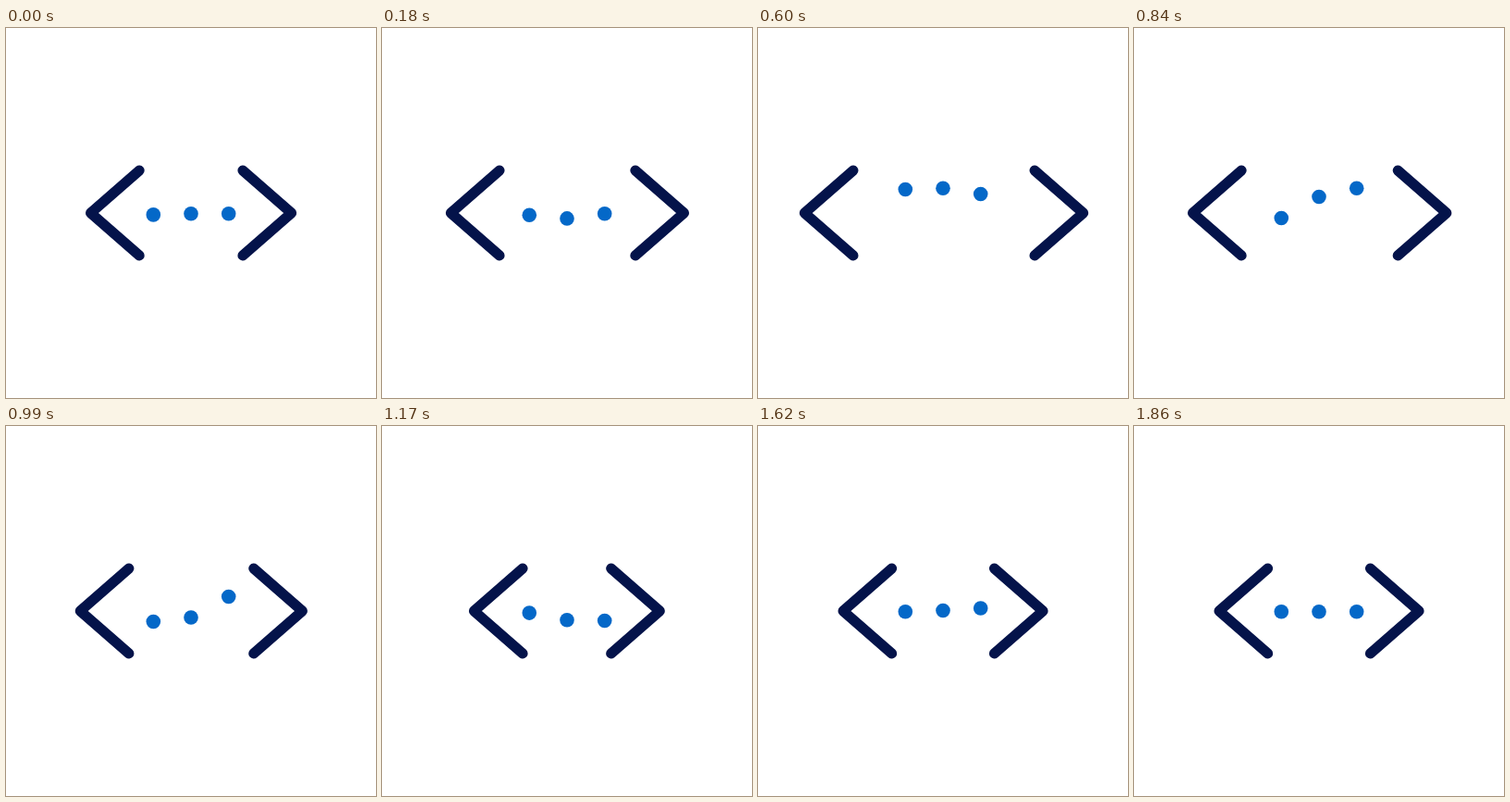
An HTML page that plays this animation: 400x400 px, repeating every 3.89 s.

```html
<!DOCTYPE html>
<html lang="en">
<head>
<meta charset="utf-8">
<title>Code brackets</title>
<style>
  html, body { margin: 0; width: 100%; height: 100%; overflow: hidden; background: #fff; }
  svg { display: block; width: 100%; height: 100%; }
  .bracket { fill: none; stroke: #04134a; stroke-width: 11; stroke-linecap: round; stroke-linejoin: round; }
  .dot { fill: #0468c8; }
</style>
</head>
<body>
<svg viewBox="0 0 400 400">
  <polyline class="bracket" id="left" points="144.7,154 92,200 144.7,246"/>
  <polyline class="bracket" id="right" points="255.4,154 308.1,200 255.4,246"/>
  <circle class="dot" cx="159.3" cy="200.8" r="7.8"/>
  <circle class="dot" cx="200" cy="200.8" r="7.8"/>
  <circle class="dot" cx="240.7" cy="200.8" r="7.8"/>
</svg>
<script>
const LOOP = 3890, STEP = 30, END = 1860;
const STAGGER = 133, REST_Y = 200.8;
const RIGHT_REACH = 1.045; // the right bracket travels slightly further

// Key poses as [ms, px]: open, hold, close past rest, settle.
const spread = ease([
  [-30, 0], [450, 43.3], [510, 43.3], [840, 28.5], [1205, -8.2], [1530, 0]
]);
// Dip, jump, fall below rest, small rebound, settle.
const bounce = ease([
  [-30, 0], [100, 8], [345, -22], [525, -28.5], [707, -18.3],
  [840, 4.7], [950, 11.2], [1315, -4], [1590, 0]
]);

// Smooth motion through the keys, at rest at both ends and turning points.
function ease(keys) {
  const last = keys.length - 1;
  const rate = i => (keys[i + 1][1] - keys[i][1]) / (keys[i + 1][0] - keys[i][0]);
  const speeds = keys.map((_, i) => {
    if (i === 0 || i === last) return 0;
    const a = rate(i - 1), b = rate(i);
    return a * b <= 0 ? 0 : 2 * a * b / (a + b);
  });
  return t => {
    if (t <= keys[0][0]) return keys[0][1];
    if (t >= keys[last][0]) return keys[last][1];
    const i = keys.findIndex(k => k[0] > t) - 1;
    const [t0, v0] = keys[i], [t1, v1] = keys[i + 1];
    const h = t1 - t0, u = (t - t0) / h, w = 1 - u;
    return w * w * ((1 + 2 * u) * v0 + u * h * speeds[i])
      + u * u * ((3 - 2 * u) * v1 - w * h * speeds[i + 1]);
  };
}

const left = document.getElementById('left');
const right = document.getElementById('right');
const dots = document.querySelectorAll('.dot');

function draw(time) {
  const t = Math.min(END, Math.floor(time / STEP) * STEP);
  const d = spread(t);
  left.setAttribute('transform', `translate(${-d} 0)`);
  right.setAttribute('transform', `translate(${d * RIGHT_REACH} 0)`);
  dots.forEach((dot, i) => dot.setAttribute('cy', REST_Y + bounce(t - i * STAGGER)));
}

const start = performance.now();
function tick() {
  draw((performance.now() - start) % LOOP);
  requestAnimationFrame(tick);
}
tick();
</script>
</body>
</html>
```
